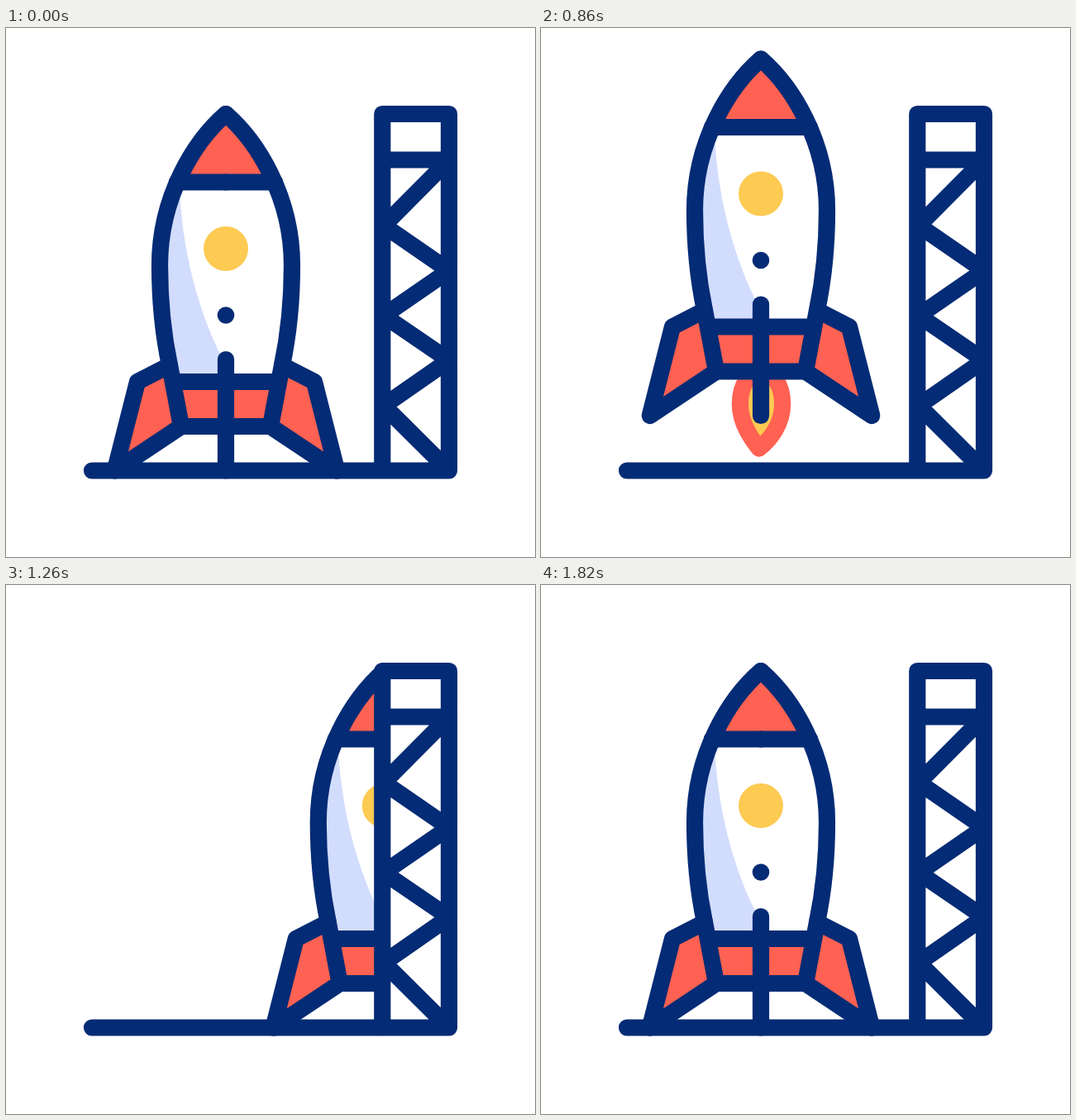
An HTML page with a canvas that plays this animation: 640 px wide and 640 px high, repeating every 2400 ms.

```html
<!DOCTYPE html>
<html lang="en">
<head>
<meta charset="utf-8">
<title>Rocket launch</title>
<style>
html, body { margin: 0; width: 100%; height: 100%; overflow: hidden; background: #fff; }
canvas { display: block; width: 100%; height: 100%; }
</style>
</head>
<body>
<canvas id="stage" width="640" height="640"></canvas>
<script>
const ctx = document.getElementById('stage').getContext('2d');
const NAVY = '#042b75', RED = '#ff6152', YELLOW = '#fdca52', PALE = '#d2dcfd';
const LOOP = 2400, STEP = 20, REST = 1820;
const CX = 266, GROUND = 535.5, TOWER_X = 455.3;

// One half of the rocket; the other half is mirrored around CX.
const bodySide = new Path2D('M266 104 C228 137 186 204 186 287 C186 330 191 375 198 408');
const body = new Path2D('M266 104 C228 137 186 204 186 287 C186 330 191 375 198 408 L202 428 H266 Z');
const nose = new Path2D('M266 104 C238 128 218 158 207 187 H266 Z');
const fin = new Path2D('M198 408 L159 428 L131.7 535.5 L212 482 Z');
const skirt = new Path2D('M202 428 H266 V482 H212 Z');
const halfBars = new Path2D('M207 186.5 H266 M202 428 H266 M212 482 H266');
const shade = new Path2D('M210 190 C212 265 232 345 266 408 V428 H202 L198 408 C191 375 186 330 186 287 C186 250 194 217 207 187 Z');

const tower = new Path2D('M104 535.5 H536 V104 H455.3 V535.5 M455.3 159.5 H536 ' +
  'L457 239 L536 293.5 L457 348 L536 402 L457 457 L536 535.5');

const clamp = v => Math.min(1, Math.max(0, v));
const smooth = v => { v = clamp(v); return v * v * (3 - 2 * v); };

function fill(path, color) {
  ctx.fillStyle = color;
  ctx.fill(path);
}

function stroke(path, color = NAVY) {
  ctx.strokeStyle = color;
  ctx.stroke(path);
}

function disc(y, r, color) {
  ctx.fillStyle = color;
  ctx.beginPath();
  ctx.arc(CX, y, r, 0, Math.PI * 2);
  ctx.fill();
}

function bothSides(draw) {
  draw();
  ctx.save();
  ctx.translate(2 * CX, 0);
  ctx.scale(-1, 1);
  draw();
  ctx.restore();
}

function drawFlame(grow) {
  const top = 482.5, tipX = CX + 0.5 - 9 * (1 - grow);
  const x = d => CX + 0.5 + d * grow, y = d => top + d * grow;
  const p = new Path2D();
  p.moveTo(x(0), y(0));
  p.bezierCurveTo(x(-21), y(0), x(-37.5), y(23), x(-37.5), y(57));
  p.bezierCurveTo(x(-37.5), y(92), x(-16), y(120), tipX, y(135.5));
  p.bezierCurveTo(x(16), y(120), x(37.5), y(92), x(37.5), y(57));
  p.bezierCurveTo(x(37.5), y(23), x(21), y(0), x(0), y(0));
  p.closePath();
  fill(p, YELLOW);
  stroke(p, RED);
}

function drawRocket(dx, dy, flame) {
  ctx.save();
  ctx.translate(dx, dy);
  if (flame !== null) drawFlame(flame);
  bothSides(() => {
    fill(body, '#fff');
    fill(nose, RED);
    fill(fin, RED);
    fill(skirt, RED);
  });
  fill(shade, PALE);
  bothSides(() => {
    stroke(bodySide);
    stroke(fin);
    stroke(halfBars);
  });
  disc(267, 27, YELLOW);
  disc(347.5, 10.3, NAVY);
  stroke(new Path2D('M266 401 V535.5'));
  ctx.restore();
}

// Sway to the right, then up and left, then back to rest.
function sway(t) {
  const right = smooth(t / 130), left = smooth((t - 130) / 190), back = smooth((t - 320) / 200);
  return {
    x: 8 * right - 24.7 * left + 16.7 * back,
    y: -2 * right - 5.3 * left + 7.3 * back
  };
}

const climb = t => -66.5 * Math.pow(Math.max(0, t - 283) / 577, 4.3);

// Steady roll out from behind the tower, slowing to a stop.
function rollOut(t) {
  if (t < 1440) return 110.5 + 0.4516 * (1440 - t);
  return 110.5 * Math.pow(Math.max(0, REST - t) / (REST - 1440), 1.553);
}

function render(t) {
  ctx.fillStyle = '#fff';
  ctx.fillRect(0, 0, 640, 640);
  ctx.lineWidth = 20.2;
  ctx.lineCap = ctx.lineJoin = 'round';

  if (t < 1400) {
    const s = sway(t);
    drawRocket(s.x, s.y + climb(t), smooth((t - 560) / 480));
  }
  if (t > 940) {
    ctx.save();
    ctx.beginPath();
    ctx.rect(0, 0, TOWER_X, 640);
    ctx.clip();
    drawRocket(rollOut(t), 0, null);
    ctx.restore();
  }
  stroke(tower);
}

const start = performance.now();
function tick() {
  const t = (performance.now() - start) % LOOP;
  render(Math.floor(t / STEP) * STEP);
  requestAnimationFrame(tick);
}
tick();
</script>
</body>
</html>
```
